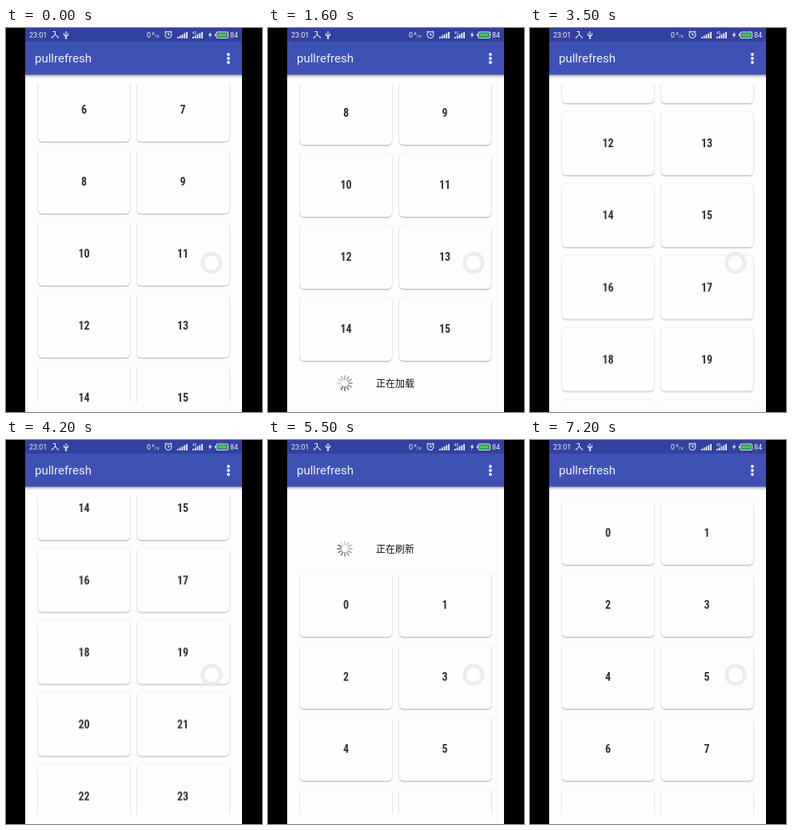
Recreate the animation shown at these times as an HTML page. Size 320 px wide and 480 px high, loop 8000 ms.

```html
<!DOCTYPE html>
<html lang="zh-CN">
<head>
<meta charset="utf-8">
<title>Pull to refresh</title>
<style>
  html, body { margin: 0; width: 100%; height: 100%; overflow: hidden; background: #000; }
  #stage { position: absolute; left: 0; top: 0; width: 320px; height: 480px; overflow: hidden; background: #000; }
  #screen { position: absolute; left: 24px; top: 0; width: 271px; height: 480px; background: #fefdfe; }
  #list { position: absolute; left: 24px; top: 70px; width: 271px; height: 398px; overflow: hidden; }
  #content { position: absolute; left: 0; top: 6px; width: 100%; will-change: transform; }
  .card {
    position: absolute; width: 115px; height: 79.5px; border-radius: 5px; background: #fefdfe;
    box-shadow: 0 1px 2px rgba(0, 0, 0, .3), 0 0 1px rgba(0, 0, 0, .12);
    font: bold 14px/81px "Roboto Condensed", Roboto, sans-serif; font-stretch: 75%;
    text-align: center; color: #30323f;
  }
  .status { position: absolute; left: 0; width: 100%; height: 20px; }
  .status svg { position: absolute; left: 62px; top: 0; }
  .status span {
    position: absolute; left: 111px; top: 0; white-space: nowrap; color: #111;
    font: 12px/20px "Noto Sans CJK SC", "Noto Sans CJK", sans-serif;
  }
  #overlay { position: absolute; left: 0; top: 0; }
  #overlay text { font-family: Roboto, sans-serif; fill: #f1f2fa; }
</style>
</head>
<body>
<div id="stage">
  <div id="screen"></div>
  <div id="list"><div id="content"></div></div>
  <svg id="overlay" width="320" height="480" viewBox="0 0 320 480">
    <defs>
      <linearGradient id="shade" x2="0" y2="1">
        <stop stop-color="#000" stop-opacity=".3"/>
        <stop offset="1" stop-color="#000" stop-opacity="0"/>
      </linearGradient>
    </defs>
    <rect x="24" y="58" width="271" height="5" fill="url(#shade)"/>
    <rect x="24" y="16" width="271" height="42.5" fill="#3f51b5"/>
    <rect x="24" width="271" height="17" fill="#32409f"/>
    <text x="36" y="43" font-size="15">pullrefresh</text>
    <g fill="#f4f5fc">
      <circle cx="278" cy="33" r="1.9"/><circle cx="278" cy="38" r="1.9"/><circle cx="278" cy="43" r="1.9"/>
    </g>

    <text x="29" y="12" font-size="9">23:01</text>
    <text x="176" y="12" font-size="9">0</text>
    <text x="182.5" y="9" font-size="5.5">K</text>
    <text x="186" y="11.5" font-size="6">/s</text>
    <text x="233" y="8" font-size="4.5">4G</text>
    <text x="280" y="12" font-size="9">84</text>

    <g fill="none" stroke="#eef0fa" stroke-width="1.1">
      <path d="M58.5 4.5H61.5V8M61.5 8L57.5 12.5M61.5 8L65.5 12.5M56.8 12.2l2-1.2M66 12.2l-2-1.2"/>
      <path d="M75 4V13M72.5 6.5V9L75 10.5L77.5 9V6.5"/>
      <circle cx="203" cy="8.5" r="4"/>
      <path d="M203 6V8.7H205M198.5 5.3L200.5 3.6M207.5 5.3L205.5 3.6"/>
      <rect x="263" y="5" width="14.5" height="7.5" rx="1.5"/>
    </g>
    <circle cx="75" cy="12.7" r="1.2" fill="#eef0fa"/>
    <rect x="264.5" y="6.5" width="11.5" height="4.5" fill="#35d32f"/>
    <path d="M261.6 7.3v3" stroke="#eef0fa" stroke-width="1.2"/>
    <path d="M256 4.5L252.8 9.2H255L254 12.8L257.5 7.8H255.3Z" fill="#eef0fa"/>
    <g id="bars" fill="#eef0fa"></g>

    <circle cx="257" cy="293.5" r="13.8" fill="#e9e9eb" fill-opacity=".85"/>
    <circle cx="257" cy="293.5" r="9" fill="#fefefe"/>
  </svg>
</div>
<script>
const LOOP = 8000, STEP = 100, PITCH = 90;
const FIRST_ROWS = 8, ALL_ROWS = 15, LOADED_AT = 2800;

// [time, scroll offset, easing towards this stop]
const linear = p => p;
const easeOut = p => 1 - (1 - p) ** 2;
const easeIn = p => p * p;
const smooth = p => p * p * (3 - 2 * p);
const stops = [
  [0, 284, linear], [300, 324, linear], [650, 386, easeOut], [900, 370, smooth],
  [2400, 370, linear], [2700, 322.5, easeOut],
  [2800, 322.5, linear], [3500, 512, smooth],
  [3600, 512, linear], [4200, 661, easeOut],
  [4300, 661, linear], [4800, 0, easeIn], [5200, -104, easeOut], [5500, -90, easeOut],
  [6100, -90, linear], [6400, 0, easeOut],
  [6600, 0, linear], [6900, 60, smooth], [7200, 0, smooth], [LOOP, 0, linear]
];

function scrollAt(t) {
  const i = Math.max(1, stops.findIndex(s => s[0] >= t));
  const [t0, a] = stops[i - 1], [t1, b, ease] = stops[i];
  return a + (b - a) * ease((t - t0) / (t1 - t0));
}

const content = document.getElementById('content');

function add(parent, tag, cls, text = '') {
  const el = document.createElement(tag);
  el.className = cls;
  el.textContent = text;
  parent.append(el);
  return el;
}

const extraCards = [];
for (let n = 0; n < ALL_ROWS * 2; n++) {
  const row = n >> 1, card = add(content, 'div', 'card', n);
  card.style.left = (n % 2 ? 139.5 : 16) + 'px';
  card.style.top = row * PITCH + 'px';
  if (row >= FIRST_ROWS) extraCards.push(card);
}

// Spinner and label, centred on the given content position
function addStatus(label, y) {
  const el = add(content, 'div', 'status');
  el.style.top = y - 10 + 'px';
  let spokes = '';
  for (let k = 0; k < 12; k++) {
    const grey = 95 + k * 11;
    spokes += `<path d="M0-4.8V-9.2" transform="rotate(${-30 * k})" stroke="rgb(${grey},${grey},${grey})"/>`;
  }
  el.innerHTML = `<svg width="20" height="20" viewBox="-10 -10 20 20">
    <g stroke-width="1.6" stroke-linecap="round">${spokes}</g></svg><span>${label}</span>`;
  return { el, wheel: el.querySelector('g') };
}
const header = addStatus('正在刷新', -30);
const footer = addStatus('正在加载', 738);

document.getElementById('bars').innerHTML = [214, 233].map(x =>
  [2, 3.5, 5, 6.5, 8].map((h, i) =>
    `<rect x="${x + i * 2.8}" y="${13 - h}" width="1.8" height="${h}"/>`).join('')).join('');

function show(el, on) { el.style.visibility = on ? 'visible' : 'hidden'; }

function draw(t) {
  const loaded = t >= LOADED_AT;
  content.style.transform = `translateY(${-scrollAt(t)}px)`;
  extraCards.forEach(card => show(card, loaded));
  show(footer.el, t < 2400);
  show(header.el, t > 4400 && t < 6400);
  const turn = `rotate(${(t / STEP * 30 + 90) % 360})`;
  header.wheel.setAttribute('transform', turn);
  footer.wheel.setAttribute('transform', turn);
}

const start = performance.now();
function tick(now) {
  const t = Math.max(0, now - start) % LOOP;
  draw(Math.floor(t / STEP) * STEP);
  requestAnimationFrame(tick);
}
draw(0);
requestAnimationFrame(tick);
</script>
</body>
</html>
```
